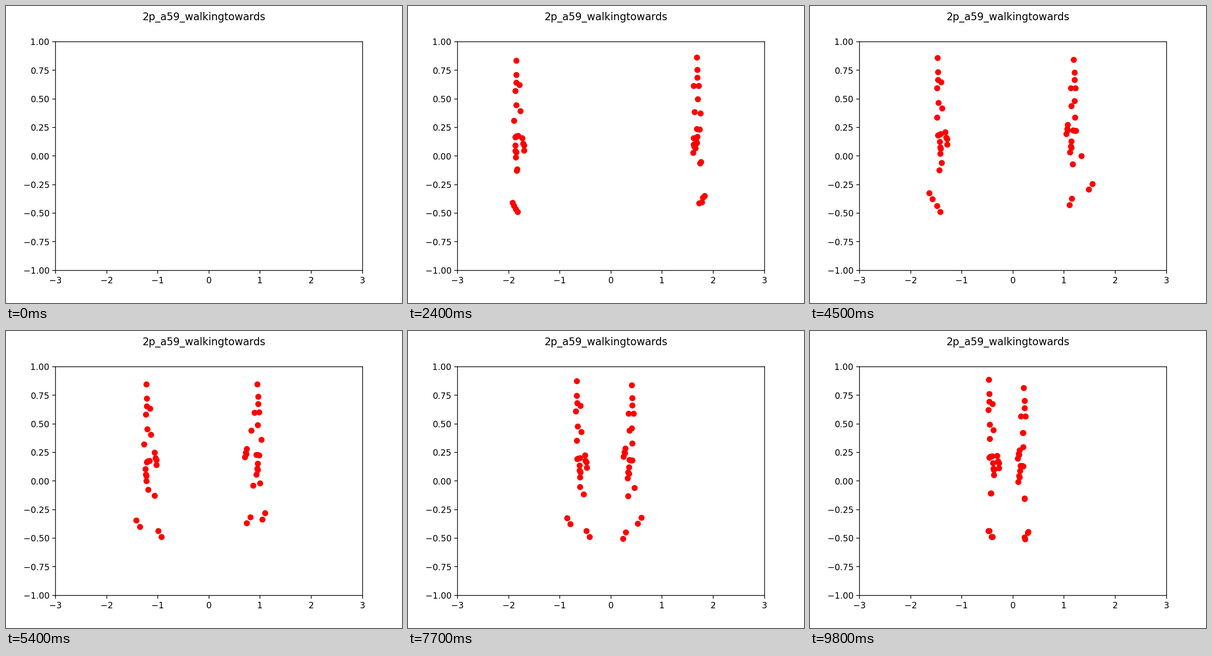
Write a matplotlib script that moves like this. It is 864 px wide and 648 px high and loops after 9900 ms.

```python
import numpy as np
import matplotlib.pyplot as plt
from matplotlib.animation import FuncAnimation

FRAMES = 99
INTERVAL = 100
TIME = np.arange(FRAMES) * INTERVAL / 1000
CYCLE = 3.2     # seconds for two steps
REACH = 5.4     # time at which the near arms are furthest forward


def span(start, end):
    return np.clip((TIME - start) / (end - start), 0, 1)


def smooth(u):
    return u * u * (3 - 2 * u)


def pair(x, y):
    return np.column_stack(np.broadcast_arrays(x, y))


def mix(amount, x, y):
    """Offset (x, y) scaled by an amount per frame."""
    return amount[:, None] * np.array((x, y), float)


def path(*keys):
    """Monotone cubic path through (time, x, y) keys."""
    keys = np.array(keys, float)
    times, points = keys[:, 0], keys[:, 1:]
    step = np.diff(times)
    rate = np.diff(points, axis=0) / step[:, None]
    a, b = rate[:-1], rate[1:]
    slope = np.zeros_like(points)
    same = a * b > 0
    slope[1:-1] = np.where(same, 2 * a * b / np.where(same, a + b, 1), 0)
    t = np.clip(TIME, times[0], times[-1])
    i = np.clip(np.searchsorted(times, t, side="right") - 1, 0, len(step) - 1)
    h = step[i][:, None]
    u = (t - times[i])[:, None] / h
    return (points[i] + smooth(u) * (points[i + 1] - points[i])
            + h * u * (1 - u) * ((1 - u) * slope[i] - u * slope[i + 1]))


# Arm rhythm: walk fades the swing in, near and far arms alternate
walk = smooth(span(3.4, 4.8))
beat = np.cos(2 * np.pi * (TIME - REACH) / CYCLE)
near = walk * (1 + beat) / 2
far = walk * (1 - beat) / 2


def torso(neck, base, head, chest, hips):
    return [neck, neck + head, neck + chest, neck + 0.49 * (base - neck),
            base, base + hips[0], base + hips[1]]


def arm(shoulder, upper, fore, tip):
    """Shoulder, elbow, wrist, fingertip, hand and thumb."""
    elbow = shoulder + upper
    wrist = elbow + fore
    return [shoulder, elbow, wrist, wrist + tip,
            wrist + 0.45 * tip, wrist + 0.58 * tip + (1.5, 0)]


def leg(base, ground, x, steps, height, foot, bend):
    """Ankle, foot and knee for steps given as (lift, land, x)."""
    x = np.full(FRAMES, float(x))
    lift = np.zeros(FRAMES)
    for start, end, goal in steps:
        u = span(start, end)
        x += smooth(u ** 1.5) * (goal - x)  # slow heel rise, quick swing
        lift += np.sin(np.pi * u)
    ankle = pair(x, ground - height * lift)
    knee = (base + ankle) / 2 + mix(0.25 + lift, bend, -2)
    return [ankle, ankle + foot, knee]


def walker_left():
    """Person on the left, walking right."""
    neck = path((2, 235.5, 149.5), (2.4, 236.5, 150.5), (3.6, 255.5, 154),
                (4.7, 285, 143.5), (5.4, 307, 147.5), (6.8, 347, 146),
                (8.6, 384, 137), (9.8, 391, 137.5))
    base = neck + (0, 134) + mix(walk, 2.5, 3)
    joints = torso(neck, base, (-0.5, -31.4), (0.2, 16.7),
                   ((-1.8, 1.6), (3.9, -1.1)))
    joints += arm(neck + (7.3, 22), np.array((2, 57)),
                  (4, 59) + mix(walk, 4, 0) + mix(near, 0, -20),
                  np.array((4, 27)))
    joints += arm(neck + (-2, 34.8), (-3.5, 65.5) + mix(far, 8, -3),
                  (3, 54) + mix(far, 5, -1), np.array((1.5, 26)))
    joints += leg(base, 436, 231.5, [(3.7, 5.3, 332), (6.6, 8.9, 391)],
                  28, (7.5, 13.5), 13)
    joints += leg(base, 436, 228, [(2.3, 3.7, 277), (4.6, 7.3, 389)],
                  28, (7.5, 13.5), 13)
    return joints


def walker_right():
    """Person on the right, walking left."""
    neck = path((1.2, 638, 133.5), (2.4, 631.5, 140), (3.6, 603, 146.5),
                (5.4, 550, 143.5), (6.8, 510.5, 145.5), (8.6, 475, 147),
                (9.8, 468, 152))
    base = neck + (2, 129) + mix(smooth(span(5, 10)), -5, 16) + mix(walk, -2, -2)
    joints = torso(neck, base, (-1.3, -27.2), (0, 16.2),
                   ((-3.3, -0.3), (2.8, 0.7)))
    joints += arm(neck + (-7.6, 34.8),
                  (1.5, 56.5) + mix(walk, 5, -22) + mix(near, -13, 5),
                  (-1.5, 57) + mix(walk, -6, -19) + mix(near, -3, 2),
                  (-1, 32) + mix(walk, -3, -14))
    joints += arm(neck + (2.5, 34.2), (4.5, 60) + mix(far, -11, 9),
                  np.array((-7.5, 51.5)), np.array((-3.3, 24.5)))
    ground = 418 + 20 * smooth(span(5, 8))
    joints += leg(base, ground, 643.5, [(3.5, 5.7, 521), (6.9, 8.6, 476)],
                  30, (-8, 12.5), -3)
    joints += leg(base, ground + 2, 648, [(2.3, 4, 572), (4.6, 7.4, 475)],
                  30, (-6, 14), -3)
    return joints


# Pixel centres of the stage to axes units
joints = np.stack(walker_left() + walker_right(), axis=1)
xs = (joints[..., 0] - 108.5) / 669.6 * 6 - 3
ys = 1 - (joints[..., 1] - 78.26) / 498.96 * 2

fig, ax = plt.subplots(figsize=(6.4, 4.8), dpi=135)
fig.suptitle("2p_a59_walkingtowards")
ax.set_xlim(-3, 3)
ax.set_ylim(-1, 1)
dots, = ax.plot([], [], "ro")


def draw(i):
    # The plot starts empty
    if i == 0:
        dots.set_data([], [])
    else:
        dots.set_data(xs[i], ys[i])
    return dots,


anim = FuncAnimation(fig, draw, frames=FRAMES, interval=INTERVAL,
                     init_func=lambda: draw(0), repeat=True, repeat_delay=0)
plt.show()
```
